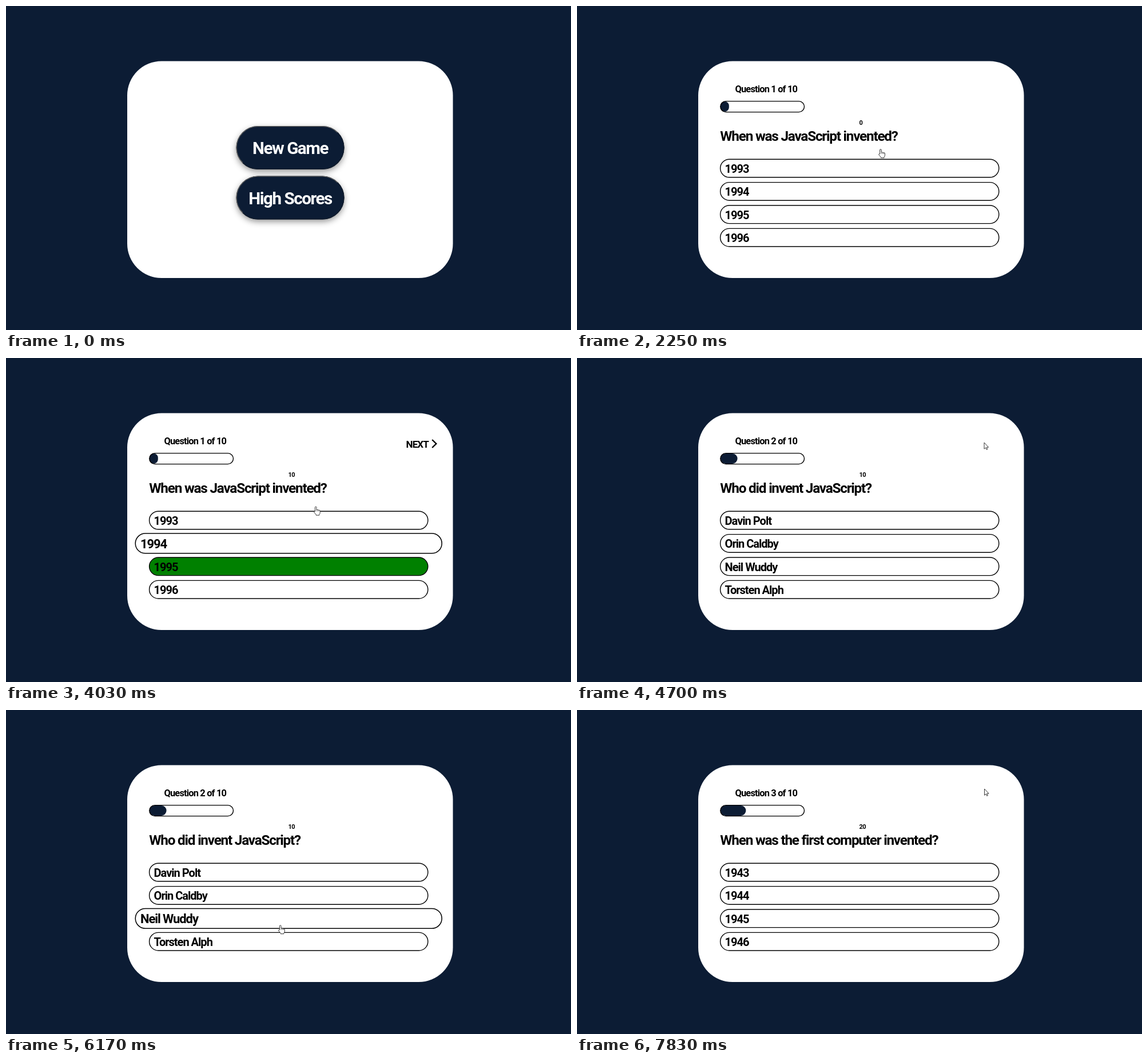
These frames come from a looping animation (988 px wide and 567 px high, 8 s). An HTML page with a canvas:

```html
<!DOCTYPE html>
<html lang="en">
<head>
<meta charset="utf-8">
<title>Quiz</title>
<style>
  html, body { margin: 0; width: 100%; height: 100%; overflow: hidden; background: #0c1c34; }
  canvas { display: block; }
</style>
</head>
<body>
<canvas id="stage" width="988" height="567"></canvas>
<script>
const ctx = document.getElementById('stage').getContext('2d');
const NAVY = '#0c1c34';
const LINE = 1.4;
const LOOP = 8000;
const FACE = 'Roboto, sans-serif';
const HOVER_LAG = 30;
const GAME_START = 1660;

const questions = [
  { start: GAME_START, answered: 3570, right: 2, text: 'When was JavaScript invented?',
    choices: ['1993', '1994', '1995', '1996'] },
  { start: 4600, answered: 6560, right: 3, text: 'Who did invent JavaScript?',
    choices: ['Davin Polt', 'Orin Caldby', 'Neil Wuddy', 'Torsten Alph'] },
  { start: 7730, answered: Infinity, right: 0, text: 'When was the first computer invented?',
    choices: ['1943', '1944', '1945', '1946'] }
];

const linear = p => p;
const easeOut = p => 1 - (1 - p) ** 2.4;
const easeInOut = p => p * p * (3 - 2 * p);

// Pointer stops: time, x, y, easing used on the way there
const stops = [
  [270, 972, 572, linear],
  [870, 531, 251, easeOut],
  [2860, 531, 251, linear],
  [3190, 534, 360, easeInOut],
  [3970, 534, 360, linear],
  [4030, 541, 261, linear],
  [4540, 712, 148, easeOut],
  [4830, 712, 148, linear],
  [5460, 545, 225, easeInOut],
  [5970, 545, 225, linear],
  [6230, 470, 400, easeInOut],
  [6900, 470, 400, linear],
  [6960, 495, 310, linear],
  [7530, 712.5, 138, easeOut]
];

const arrow = new Path2D('M0 0V11.2L2.6 8.9 4.2 12.4 5.9 11.6 4.3 8.2H7.6Z');
const hand = new Path2D('M-1.4 8V1a1.3 1.3 0 0 1 2.6 0V5.2q1.2-.8 2.2.2 1.2-.5 2 .5 ' +
  '2-.5 2 1.2v3q0 2-1.4 3.2v1.4H.4v-1.2L-3 9.6q-.9-1.6.4-1.8Z');

const clamp = v => Math.max(0, Math.min(1, v));
const ramp = (t, from, to) => clamp((t - from) / (to - from));
const rowTop = i => 267.8 + i * 40.4;
const inside = (p, x, y, w, h) => p.x >= x && p.x <= x + w && p.y >= y && p.y <= y + h;

function pointerAt(t) {
  const next = stops.findIndex(s => s[0] > t);
  if (next === 0) return { x: -100, y: -100 };
  if (next < 0) return { x: stops.at(-1)[1], y: stops.at(-1)[2] };
  const [t0, x0, y0] = stops[next - 1];
  const [t1, x1, y1, ease] = stops[next];
  const k = ease(ramp(t, t0, t1));
  return { x: x0 + (x1 - x0) * k, y: y0 + (y1 - y0) * k };
}

function pill(x, y, w, h, r) {
  ctx.beginPath();
  ctx.roundRect(x, y, w, h, r);
}

function label(text, x, y, size, color = '#000', align = 'left') {
  ctx.font = `bold ${size}px ${FACE}`;
  ctx.letterSpacing = `${-0.05 * size}px`;
  ctx.textAlign = align;
  ctx.fillStyle = color;
  ctx.fillText(text, x, y);
}

function scaled(cx, cy, k, draw) {
  ctx.save();
  ctx.translate(cx, cy);
  ctx.scale(k, k);
  draw();
  ctx.restore();
}

// One half of an outset border, split along the diagonal
function halfBorder(color, angle) {
  ctx.save();
  ctx.rotate(angle);
  ctx.strokeStyle = color;
  ctx.lineWidth = LINE;
  ctx.beginPath();
  ctx.arc(-56.5, 0, 37.4, 0.75 * Math.PI, 1.5 * Math.PI);
  ctx.arc(56.5, 0, 37.4, 1.5 * Math.PI, 1.75 * Math.PI);
  ctx.stroke();
  ctx.restore();
}

function menuButton(text, cy, hovered) {
  scaled(497, cy, hovered ? 1.1 : 1, () => {
    ctx.save();
    ctx.shadowColor = 'rgba(0,0,0,.42)';
    ctx.shadowBlur = 11;
    ctx.shadowOffsetY = 4;
    ctx.fillStyle = NAVY;
    pill(-94.5, -38, 189, 76, 38);
    ctx.fill();
    ctx.restore();
    halfBorder('#5c5c5c', 0);
    halfBorder('#101a29', Math.PI);
    label(text, 0, 11, 29.6, '#fff', 'center');
  });
}

function drawMenu(mouse) {
  const hovered = inside(mouse, 402, 210, 189, 76);
  menuButton('High Scores', 335.5, false);
  menuButton('New Game', 248, hovered);
  return hovered;
}

function choiceRow(text, i, hovered, correct) {
  scaled(494.2, rowTop(i) + 16.2, hovered ? 1.1 : 1, () => {
    ctx.fillStyle = correct ? '#008000' : '#fff';
    ctx.strokeStyle = '#000';
    ctx.lineWidth = LINE;
    pill(-243.6, -15.8, 487.2, 31.6, 15.8);
    ctx.fill();
    ctx.stroke();
    label(text, -235.6, 7.9, 20);
  });
}

function drawProgress(number) {
  ctx.fillStyle = NAVY;
  pill(251, 167, 14.8 * number, 18, Math.min(9, 7.4 * number));
  ctx.fill();
  ctx.strokeStyle = '#000';
  ctx.lineWidth = LINE;
  pill(250.7, 166.6, 146.8, 19, 9.5);
  ctx.stroke();
}

function drawNext() {
  label('NEXT', 699.5, 157, 17);
  ctx.strokeStyle = '#000';
  ctx.lineWidth = 2.4;
  ctx.beginPath();
  ctx.moveTo(745.2, 143);
  ctx.lineTo(752.3, 150);
  ctx.lineTo(745.2, 157);
  ctx.stroke();
}

function drawGame(t, mouse) {
  const index = questions.findLastIndex(q => t >= q.start);
  const q = questions[index];
  const answered = t >= q.answered;
  const score = 10 * (index + (answered ? 1 : 0));

  label(`Question ${index + 1} of 10`, 276.5, 151, 16.4);
  drawProgress(index + 1);
  label(String(score), 493.6, 208, 11);
  label(q.text, 250.3, 236.3, 24.3);

  const over = q.choices.findIndex((_, i) => inside(mouse, 250, rowTop(i), 488, 32.4));
  q.choices.forEach((text, i) => choiceRow(text, i, i === over, answered && i === q.right));
  if (answered) drawNext();

  // The pointer keeps its hand shape until it first moves on the new page
  return over >= 0 || (answered && inside(mouse, 697, 132, 58, 30)) || t < 2900;
}

function drawStatus(t) {
  const alpha = ramp(t, 1020, 1150) * (1 - ramp(t, 2060, 2250));
  if (!alpha) return;
  ctx.save();
  ctx.globalAlpha = alpha;
  ctx.fillStyle = '#f1f3f4';
  pill(-4, 555, 67.5, 16, 3);
  ctx.fill();
  ctx.font = '8.7px "Open Sans", sans-serif';
  ctx.letterSpacing = '0px';
  ctx.textAlign = 'right';
  ctx.fillStyle = '#4a4d51';
  ctx.fillText('uiz/game.html', 57.5, 566);
  ctx.restore();
}

function drawPointer({ x, y }, shape) {
  ctx.save();
  ctx.translate(x, y);
  ctx.lineJoin = 'round';
  ctx.lineWidth = 0.9;
  ctx.fillStyle = '#fff';
  ctx.strokeStyle = '#222';
  ctx.fill(shape);
  ctx.stroke(shape);
  if (shape === hand) {
    ctx.beginPath();
    for (const fingerX of [1.2, 3.4, 5.4]) {
      ctx.moveTo(fingerX, 5.6);
      ctx.lineTo(fingerX, 8);
    }
    ctx.lineWidth = 0.6;
    ctx.stroke();
  }
  ctx.restore();
}

function render(t) {
  ctx.fillStyle = NAVY;
  ctx.fillRect(0, 0, 988, 567);
  ctx.fillStyle = '#fff';
  pill(212, 96.5, 569.5, 379.5, 60);
  ctx.fill();

  const mouse = pointerAt(t - HOVER_LAG);
  const clickable = t < GAME_START ? drawMenu(mouse) : drawGame(t, mouse);
  drawStatus(t);
  drawPointer(pointerAt(t), clickable ? hand : arrow);
}

function tick() {
  render(performance.now() % LOOP);
  requestAnimationFrame(tick);
}
tick();
</script>
</body>
</html>
```
